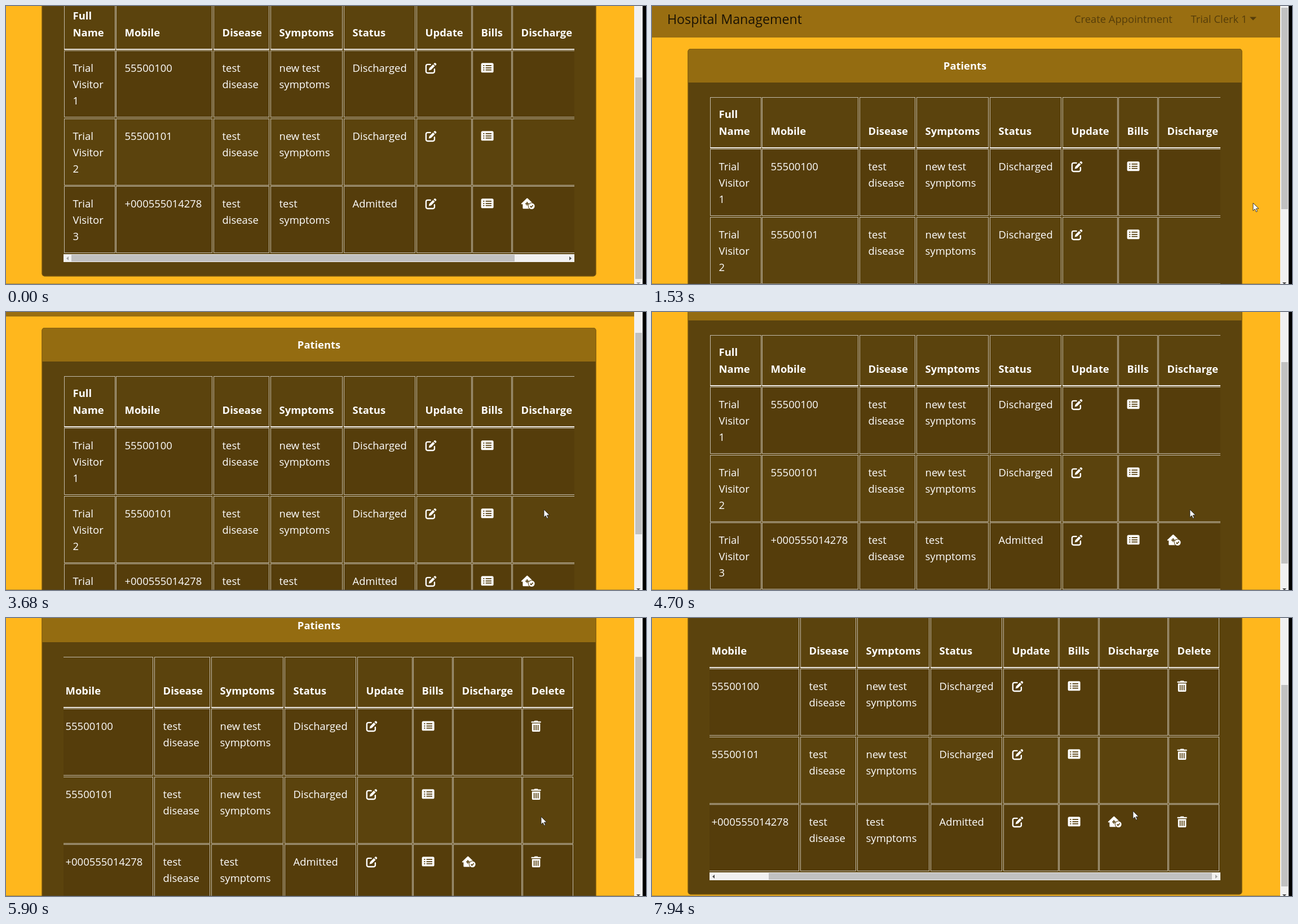
An HTML page for the animation above (8 s loop, 1135 by 494 pixels).

```html
<!DOCTYPE html>
<html lang="en">
<head>
<meta charset="utf-8">
<title>Patients</title>
<style>
  html, body { margin: 0; width: 100%; height: 100%; overflow: hidden; background: #ffb71d; }
  svg { display: block; width: 1135px; height: 494px; font: 18.4px "Open Sans", "Noto Sans", sans-serif; fill: #fff; }
  .b { font-weight: 700; }
  rect { shape-rendering: crispEdges; }
  rect.r { shape-rendering: auto; }
  .cell { fill: none; stroke: #c3bcad; }
  .odd { fill: #553d0b; }
  .cut { fill: #553d0b; }
  .ln { fill: none; stroke: #553d0b; stroke-width: 1.7; }
  .track { fill: #f1f1f1; }
  .thumb { fill: #c1c1c1; }
</style>
</head>
<body>
<svg viewBox="0 0 1135 494">
  <defs>
    <clipPath id="view"><rect x="102" y="0" width="906" height="700"/></clipPath>
    <g id="edit">
      <path d="M9 3.6H4A2.7 2.7 0 0 0 1.3 6.3V16A2.7 2.7 0 0 0 4 18.7H13.6A2.7 2.7 0 0 0 16.3 16V12" fill="none" stroke="#fff" stroke-width="2.4" stroke-linecap="round"/>
      <path d="M6.1 14.2l1-4.1 6.7-6.7 3.1 3.1-6.7 6.7zM14.7 2.5L16 1.2a1.7 1.7 0 0 1 2.3 0l.9.9a1.7 1.7 0 0 1 0 2.3l-1.3 1.3z"/>
    </g>
    <g id="list">
      <rect class="r" y="1" width="22" height="17" rx="2.6"/>
      <path class="ln" d="M3.6 5.6h2.2M3.6 9.5h2.2M3.6 13.4h2.2M8 5.6h10.4M8 9.5h10.4M8 13.4h10.4"/>
    </g>
    <g id="home">
      <path d="M0 9.9L9.9.5q.8-.7 1.6 0L21.4 9.9l-.6 1H18.5V19H4q-1.2 0-1.2-1.2V10.9H.6z"/>
      <path class="ln" d="M10.6 6.8v6.4M7.4 10h6.4"/>
      <circle class="cut" cx="18.6" cy="14.3" r="6.4"/>
      <circle cx="18.6" cy="14.3" r="5.4"/>
      <path class="ln" d="M16 14.4l1.8 1.8 3.2-3.5"/>
    </g>
    <g id="trash">
      <path d="M0 1.4h5l.8-1.2h5.4l.8 1.2h5v2.4H0zM1.2 5h14.6v12.6a2.2 2.2 0 0 1-2.2 2.2H3.4a2.2 2.2 0 0 1-2.2-2.2z"/>
      <path class="ln" d="M5 7.6v9.6M8.5 7.6v9.6M12 7.6v9.6"/>
    </g>
  </defs>

  <g id="page">
    <rect x="0" y="-30" width="1114" height="86" fill="#996e11"/>
    <text x="27" y="31.5" font-size="23.2" fill="#1a1204">Hospital Management</text>
    <g fill="#553d0a">
      <text x="749" y="29.5">Create Appointment</text>
      <text x="1055.5" y="29.5" text-anchor="end">Trial Clerk 1</text>
      <path d="M1060 19.5h12l-6 6z"/>
    </g>
    <rect class="r" x="63.5" y="76" width="983" height="579.5" rx="5" fill="#5b430d"/>
    <path d="M63.5 136V81a5 5 0 0 1 5-5h973a5 5 0 0 1 5 5v55z" fill="#946c11"/>
    <rect class="r" x="64" y="76.5" width="982" height="578.5" rx="4.5" fill="none" stroke="#86600f"/>
    <text class="b" x="555" y="113" text-anchor="middle">Patients</text>
    <g clip-path="url(#view)"><g id="table"></g></g>
    <rect class="track" x="102" y="616" width="906" height="14"/>
    <rect class="thumb" id="hthumb" y="617" width="786" height="12"/>
    <path id="left" d="M111 620v7l-4-3.5z"/>
    <path id="right" d="M999 620v7l4-3.5z"/>
  </g>

  <rect y="493" width="1114" height="1" fill="#444" opacity=".4"/>
  <rect class="track" x="1114" width="15" height="494"/>
  <rect class="thumb" id="vthumb" x="1116" width="12" height="358"/>
  <path id="down" d="M1118 491h7l-3.5 4z"/>
  <rect x="1129" width="6" height="494" fill="#000"/>
  <path id="cursor" d="M0 0v13.8l3.2-3 2.2 5 2.1-.9-2.1-4.9h4.5z" stroke="#222" stroke-width=".9"/>
</svg>
<script>
const $ = id => document.getElementById(id);

// left edge, right edge, heading
const cols = [
  [103, 193, "Full|Name"], [195, 365, "Mobile"], [368, 466, "Disease"],
  [469, 596, "Symptoms"], [599, 725, "Status"], [728, 825, "Update"],
  [827, 896, "Bills"], [898, 1019, "Discharge"], [1021, 1110, "Delete"]
];
const rows = [
  ["Trial|Visitor|1", "55500100", "test|disease", "new test|symptoms", "Discharged", "#edit", "#list", "", "#trash"],
  ["Trial|Visitor|2", "55500101", "test|disease", "new test|symptoms", "Discharged", "#edit", "#list", "", "#trash"],
  ["Trial|Visitor|3", "+000555014278", "test|disease", "test|symptoms", "Admitted", "#edit", "#list", "#home", "#trash"]
];

const lines = (s, x, y, cls = "") => s.split("|").map((word, i) =>
  `<text class="${cls}" x="${x}" y="${y + i * 29.2}">${word}</text>`).join("");
const box = (l, r, y, h, cls) =>
  `<rect class="${cls}" x="${l + .5}" y="${y + .5}" width="${r - l}" height="${h}"/>`;

let html = "";
cols.forEach(([l, r, title], c) => {
  const x = l + 15.6;
  html += box(l, r, 162, 89, "cell") +
    `<rect x="${l}" y="251" width="${r - l + 1}" height="2" fill="#eeeae6"/>` +
    lines(title, x, c ? 228.5 : 199.3, "b");
  rows.forEach((row, i) => {
    const y = Math.round(254 + i * 120.6), s = row[c];
    html += box(l, r, y, 118, i % 2 ? "cell" : "cell odd");
    html += s[0] === "#"
      ? `<use href="${s}" x="${x}" y="${y + 21.3}"/>`
      : lines(s, x, y + 37.5);
  });
});
$("table").innerHTML = html;

// runs: [start ms, end ms, steps, ease-out power, ...values reached]
const scrollRuns = [
  [590, 1200, 10, 1.2, 2], [1530, 1530, 1, 1, 0], [3470, 4220, 12, 1.22, 123],
  [4290, 4290, 1, 1, 125], [4700, 5040, 5, .6, 93], [6770, 7400, 10, 1.43, 175],
  [7600, 7940, 6, 1, 164]
];
const slideRuns = [[5430, 5900, 8, 1.2, 105]];
const cursorRuns = [
  [70, 310, 5, 1.5, 1066, 350], [1790, 2130, 5, 1.2, 1057, 334],
  [2660, 3010, 6, 1.3, 954, 351], [5430, 5900, 8, 1, 949, 353],
  [6630, 6910, 5, 1.2, 853, 343]
];

function at(t, v, runs) {
  for (const [start, end, n, power, ...to] of runs) {
    if (t < start) break;
    const step = end > start ? Math.floor((t - start) / (end - start) * (n - 1) + .05) + 1 : n;
    const p = 1 - (1 - Math.min(1, step / n)) ** power;
    v = v.map((a, i) => a + (to[i] - a) * p);
  }
  return v.map(Math.round);
}

function draw(now) {
  const t = now % 8000;
  const [scroll] = at(t, [175], scrollRuns);
  const [slide] = at(t, [0], slideRuns);
  const [x, y] = at(t, [1112, 530], cursorRuns);
  const shade = on => on ? "#505050" : "#a3a3a3";
  $("page").setAttribute("transform", `translate(0 ${-scroll})`);
  $("table").setAttribute("transform", `translate(${-slide} 0)`);
  $("hthumb").setAttribute("x", Math.round(116 + slide * 91 / 105));
  $("vthumb").setAttribute("y", Math.round(3 + scroll * .709));
  $("left").setAttribute("fill", shade(slide > 0));
  $("right").setAttribute("fill", shade(slide < 105));
  $("down").setAttribute("fill", shade(scroll < 175));
  $("cursor").setAttribute("transform", `translate(${x} ${y})`);
}

const begin = performance.now();
function loop() {
  draw(performance.now() - begin);
  requestAnimationFrame(loop);
}
loop();
</script>
</body>
</html>
```
